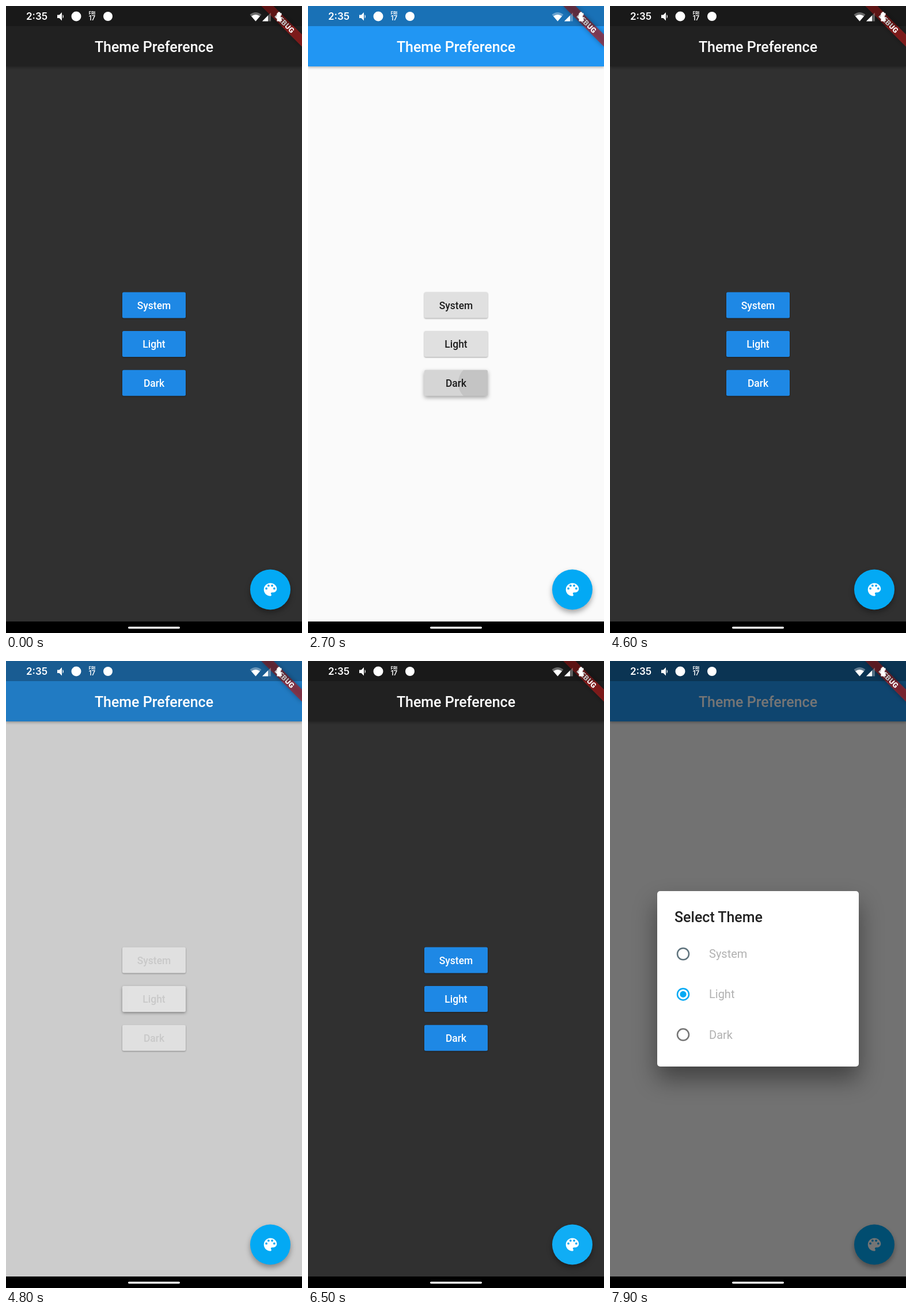
These frames come from a looping animation (514x1090 px, 8000 ms). An HTML page:

```html
<!DOCTYPE html>
<html lang="en">
<head>
<meta charset="utf-8">
<title>Theme Preference</title>
<style>
  html, body { margin: 0; width: 100%; height: 100%; overflow: hidden; background: #000; }
  svg { display: block; width: 100%; height: 100%; }
  text { font-family: Roboto, "Noto Sans", sans-serif; }
  .title { font-size: 25px; font-weight: 500; }
  .label { font-size: 17.5px; font-weight: 500; text-anchor: middle; }
  .item { font-size: 20px; }
  .clock { font: 600 17px Inter, sans-serif; }
  .day { font: 700 7.5px Inter, sans-serif; text-anchor: middle; }
  .date { font: 600 11.5px Inter, sans-serif; text-anchor: middle; }
  .debug { font-size: 12.75px; font-weight: 900; letter-spacing: .3px; text-anchor: middle; }
  #bar { filter: drop-shadow(0 2px 2px rgba(0,0,0,.28)); }
  #fab { filter: drop-shadow(0 5px 5px rgba(0,0,0,.34)); }
  #sheet { filter: drop-shadow(0 22px 20px rgba(0,0,0,.42)); }
  #ribbon { filter: drop-shadow(0 0 4px rgba(0,0,0,.5)); }
</style>
</head>
<body>
<svg viewBox="0 0 514 1090" preserveAspectRatio="none">
  <rect id="page" width="514" height="1070"/>
  <g id="buttons"></g>

  <circle id="fab" cx="459" cy="1014.5" r="35" fill="#03a9f4"/>
  <circle id="fabInk" cx="459" cy="1014.5" r="35" fill="#fff"/>
  <g transform="translate(444 999.5) scale(1.25)">
    <path fill="#fff" d="M12 3c-4.97 0-9 4.03-9 9s4.03 9 9 9c.83 0 1.5-.67 1.5-1.5 0-.39-.15-.74-.39-1.01-.23-.26-.38-.61-.38-.99 0-.83.67-1.5 1.5-1.5H16c2.76 0 5-2.24 5-5 0-4.42-4.03-8-9-8z"/>
    <g fill="#03a9f4">
      <circle cx="6.5" cy="10.5" r="1.5"/><circle cx="9.5" cy="6.5" r="1.5"/>
      <circle cx="14.5" cy="6.5" r="1.5"/><circle cx="17.5" cy="10.5" r="1.5"/>
    </g>
  </g>

  <rect id="bar" width="514" height="105"/>
  <text class="title" x="257" y="79.5" fill="#fff" text-anchor="middle">Theme Preference</text>

  <rect id="scrim" width="514" height="1070"/>
  <g id="dialog">
    <rect id="sheet" x="82" y="400" width="350" height="305" rx="5"/>
    <text id="heading" class="title" x="112" y="454">Select Theme</text>
    <rect id="rowInk" x="82" y="544.5" width="350" height="70" fill="#ccc"/>
    <g id="options"></g>
  </g>

  <g transform="translate(514 0) rotate(45)">
    <rect id="ribbon" x="-50" y="35" width="100" height="15" fill="#b71c1c" fill-opacity=".63"/>
    <text class="debug" x="0" y="47" fill="#fff">DEBUG</text>
  </g>
  <rect width="514" height="35" fill-opacity=".25"/>

  <g fill="#fff">
    <text class="clock" x="35" y="24">2:35</text>
    <path d="M89 15.5h3.5l4.500-4.500v14.500l-4.500-4.500H89z"/>
    <path d="M98.500 14.700q3 3.500 0 7z"/>
    <circle cx="122" cy="18" r="8.500"/>
    <text class="day" x="149.500" y="15">FRI</text>
    <text class="date" x="149.500" y="25">17</text>
    <circle cx="177" cy="18" r="8"/>
    <path fill-opacity=".35" d="M423.500 15q10-8 20 0L433.500 26.500z"/>
    <path d="M426 17.800q7.500-5.600 15 0L433.500 26.500z"/>
    <path fill-opacity=".3" d="M445 26.500L460 11.500v15z"/>
    <path d="M445 26.500L455 16.500v10z"/>
    <path d="M472 10.500h4v1.700h2.500v4.300h-1.500v3.500h1.500v6.500h-8v-5h-1.200v-3.500h1.200v-5.800h1.500z"/>
  </g>

  <rect y="1070" width="514" height="20"/>
  <rect x="212" y="1079" width="90" height="3.600" rx="1.800" fill="#fff"/>
</svg>

<script>
const LOOP = 8000, STEP = 100;   // the picture advances ten times a second
const NAMES = ['System', 'Light', 'Dark'];
const ACCENT = [3, 169, 244, 1];

// Each tap presses one button and fades the theme: light = 1, dark = 0.
const TAPS = [
  { at: 891, button: 1, light: 1 },
  { at: 2700, button: 2, light: 0 },
  { at: 4646, button: 1, light: 1 },
  { at: 5476, button: 0, light: 0 }
];
const PICK = { at: 7660, light: 1 };
const CHANGES = [...TAPS, PICK];
const FADE = 200, TEXT_DELAY = 110, DIALOG_AT = 6540;

// [dark, light] pairs
const COLORS = {
  page: [[48, 48, 48, 1], [250, 250, 250, 1]],
  bar: [[33, 33, 33, 1], [33, 150, 243, 1]],
  button: [[30, 136, 229, 1], [224, 224, 224, 1]],
  text: [[255, 255, 255, 1], [0, 0, 0, .87]],
  sheet: [[66, 66, 66, 1], [255, 255, 255, 1]],
  radio: [[255, 255, 255, .7], [0, 0, 0, .54]]
};

const $ = id => document.getElementById(id);
const clamp = v => Math.min(1, Math.max(0, v));
const ramp = (t, start, length) => clamp((t - start) / length);
const mix = (a, b, k) => a.map((v, i) => v + (b[i] - v) * k);
const css = c => `rgba(${c.slice(0, 3).map(Math.round)},${c[3]})`;
const tone = (name, k) => mix(...COLORS[name], k);
const set = (node, attrs) => {
  for (const key in attrs) node.setAttribute(key, attrs[key]);
};

function make(tag, parent, attrs, text) {
  const node = document.createElementNS('http://www.w3.org/2000/svg', tag);
  set(node, attrs);
  if (text) node.textContent = text;
  parent.appendChild(node);
  return node;
}

const buttons = NAMES.map((name, i) => {
  const y = 497.5 + i * 67.6, group = $('buttons');
  const box = { x: 202, y, width: 110, height: 45, rx: 2.5 };
  const clip = make('clipPath', group, { id: 'clip' + i });
  make('rect', clip, box);
  return {
    face: make('rect', group, box),
    glow: make('rect', group, box),
    ink: make('circle', group, { cx: 294, cy: y + 22.5, 'clip-path': `url(#clip${i})` }),
    label: make('text', group, { class: 'label', x: 257, y: y + 29 }, name)
  };
});

const options = NAMES.map((name, i) => {
  const cy = 509.2 + i * 70.2, group = $('options');
  return {
    ring: make('circle', group, { cx: 127, cy, r: 10, fill: 'none', 'stroke-width': 2.5 }),
    dot: make('circle', group, { cx: 127, cy, fill: css(ACCENT) }),
    label: make('text', group, { class: 'item', x: 172, y: cy + 7 }, name)
  };
});

// Theme position at t, fading from each tap after an optional delay.
function themeAt(t, delay = 0) {
  let k = 0;
  for (const c of CHANGES) {
    const p = ramp(t, c.at + delay, FADE);
    if (p > 0) k += (c.light - k) * p;
  }
  return k;
}

function drawButtons(t, k) {
  const face = css(tone('button', k >= .5 ? 1 : 0));
  const text = css(tone('text', themeAt(t, TEXT_DELAY)));
  buttons.forEach((b, i) => {
    const tap = TAPS.find(c => c.button === i && t >= c.at - 46 && t < c.at + 400);
    const age = tap ? t - tap.at + 46 : 0;
    const press = tap ? ramp(age, 0, 50) * (1 - ramp(age, 100, 200)) : 0;
    const ink = tap && !tap.light ? '#000' : '#fff';
    set(b.face, { fill: face });
    b.face.style.filter = `drop-shadow(0 ${1.5 + 2.5 * press}px ${1.3 + 2.5 * press}px rgba(0,0,0,.36))`;
    set(b.glow, { fill: ink, 'fill-opacity': .055 * press });
    set(b.ink, { fill: ink, 'fill-opacity': .09 * press, r: 18 + age * .33 });
    set(b.label, { fill: text });
  });
}

function drawDialog(t, k) {
  const open = ramp(t, DIALOG_AT, 150);
  const shown = 1 - (1 - open) ** 2;
  set($('scrim'), { 'fill-opacity': .54 * shown });
  set($('dialog'), { opacity: shown, visibility: open ? 'visible' : 'hidden' });
  set($('sheet'), { fill: css(tone('sheet', k)) });
  set($('heading'), { fill: css(tone('text', k)) });
  set($('rowInk'), { 'fill-opacity': t < 7600 ? 0 : .15 * (1 - ramp(t, 7600, 260)) });

  const idle = tone('radio', k);
  const text = css(tone('text', ramp(t, 7836, FADE)));
  const picked = [1 - ramp(t, PICK.at, 300), ramp(t, PICK.at, FADE), 0];
  const dots = [1 - ramp(t, PICK.at, FADE), picked[1], 0];
  options.forEach((o, i) => {
    set(o.ring, { stroke: css(mix(idle, ACCENT, picked[i])) });
    set(o.dot, { r: 5.6 * dots[i] });
    set(o.label, { fill: text });
  });
}

function draw(t) {
  const k = themeAt(t);
  set($('page'), { fill: css(tone('page', k)) });
  set($('bar'), { fill: css(tone('bar', k)) });
  set($('fabInk'), { 'fill-opacity': t < 6500 ? 0 : .05 * (1 - ramp(t, 6500, 300)) });
  drawButtons(t, k);
  drawDialog(t, k);
}

const start = performance.now();
function tick() {
  const t = (performance.now() - start) % LOOP;
  draw(Math.floor(t / STEP) * STEP);
  requestAnimationFrame(tick);
}
tick();
</script>
</body>
</html>
```
